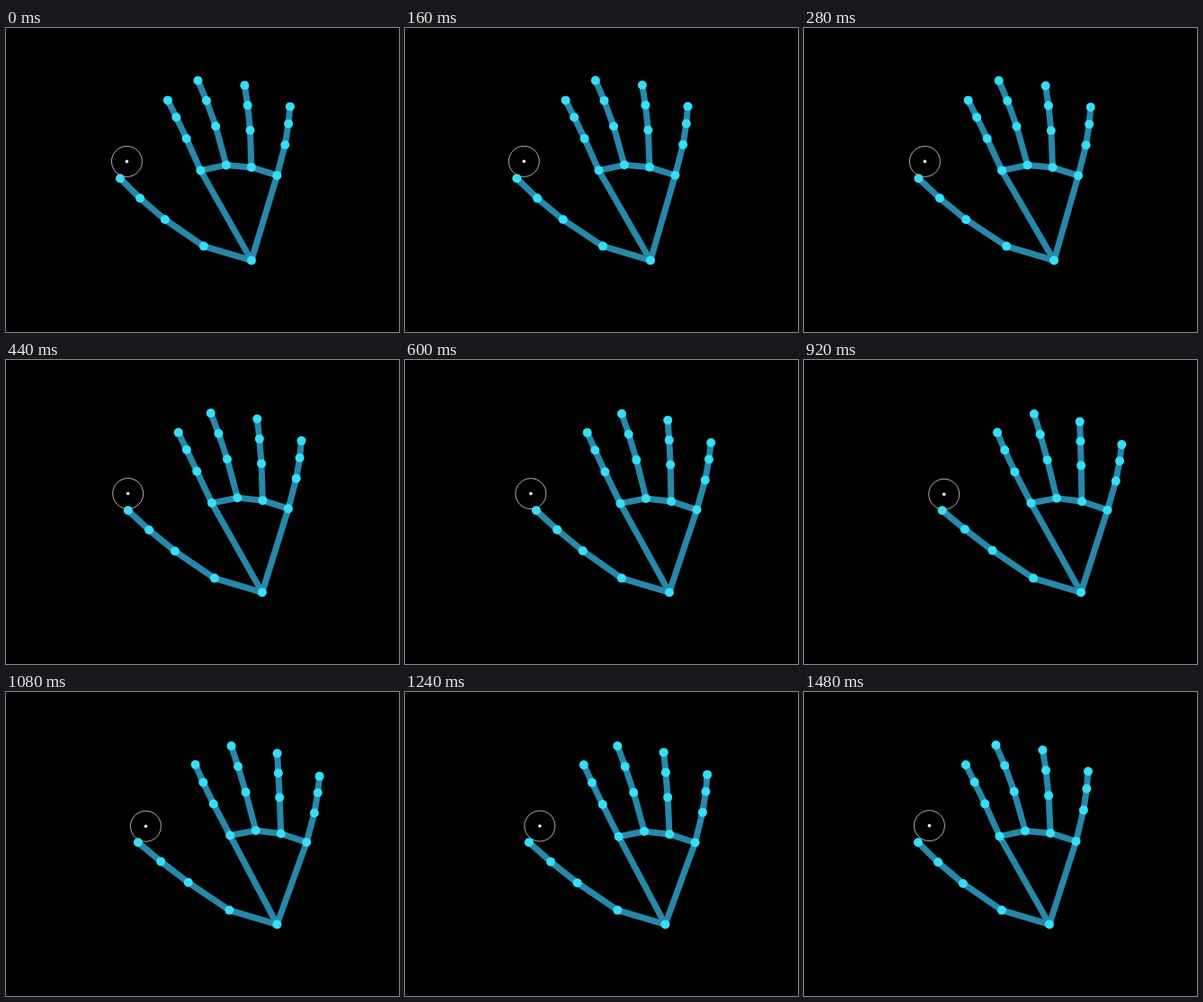
These frames come from a looping animation (437x338 px, 1.52 s). An HTML page with a canvas:

```html
<!DOCTYPE html>
<html lang="en">
<head>
<meta charset="utf-8">
<title>Hand tracking</title>
<style>
  html, body { margin: 0; width: 100%; height: 100%; overflow: hidden; background: #000; }
  canvas { display: block; }
</style>
</head>
<body>
<canvas id="stage" width="437" height="338"></canvas>
<script>
const ctx = document.getElementById("stage").getContext("2d");
const LOOP = 1520, STEP = 40;
const KEYS = [0, 280, 600, 800, 1080, 1240, 1480];

// Sideways sway of each part of the rig, in px from rest
const sway = {
  wrist: [0, 5.2, 21, 34.7, 28.5, 16.5, 0],
  palm: [0, 3.6, 23.1, 33.9, 32.8, 21.2, 1.1],
  tips: [0, 3, 25.3, 37.4, 34.1, 21, 0],
  thumb: [0, 0.5, 19, 28, 20, 11, 0],
  cursor: [0, 0, 5.5, 18, 21, 15.5, 5]
};
const palmDrop = [0, 0, 1.2, 0.8, 1.1, 2.3, 2];
const START_DRIFT = -0.06; // px per ms

// reach: tip sway gain; tilt: sinking per px of sway;
// bow: sideways bulge; straighten: bulge lost per px of sway
const fingers = [
  { knuckle: [216, 158], tip: [179.5, 80], reach: 0.9, tilt: 0, bow: 0.8, straighten: 0.06 },
  { knuckle: [244.5, 152], tip: [213, 58], reach: 1.09, tilt: 0.04, bow: 2.6, straighten: 0.045 },
  { knuckle: [272.5, 154.5], tip: [265, 63.3], reach: 1.06, tilt: 0.13, bow: 2, straighten: 0.05 },
  { knuckle: [301, 163.5], tip: [315.5, 87], reach: 0.96, tilt: 0.18, bow: 2.4, straighten: 0.005 }
];
const thumb = { knuckle: [219.5, 242.2], tip: [126.5, 166.8], bow: -4.2, straighten: -0.05 };

function slope(track, i, first) {
  const rate = k => (track[k + 1] - track[k]) / (KEYS[k + 1] - KEYS[k]);
  if (i === 0) return first;
  if (i === KEYS.length - 1) return rate(i - 1);
  const before = KEYS[i] - KEYS[i - 1], after = KEYS[i + 1] - KEYS[i];
  return (rate(i - 1) * after + rate(i) * before) / (before + after);
}

// Cubic Hermite through the key points
function sample(track, t, first = START_DRIFT) {
  const last = KEYS.length - 1;
  if (t >= KEYS[last]) return track[last];
  const i = KEYS.findIndex((key, k) => t < KEYS[k + 1]);
  const span = KEYS[i + 1] - KEYS[i], u = (t - KEYS[i]) / span;
  const ease = u * u * (3 - 2 * u);
  return track[i] + (track[i + 1] - track[i]) * ease
    + span * u * (1 - u) * ((1 - u) * slope(track, i, first) - u * slope(track, i + 1, first));
}

// Four joints on a slightly bowed line from knuckle to tip
function chain([x0, y0], [x1, y1], bow, split) {
  const dx = x1 - x0, dy = y1 - y0, length = Math.hypot(dx, dy);
  return [0, split, split + 0.305, 1].map(f => {
    const bulge = bow * 4 * f * (1 - f) / length;
    return [x0 + dx * f - dy * bulge, y0 + dy * f + dx * bulge];
  });
}

function fingerPose({ knuckle, tip, reach, tilt, bow, straighten }, palm, tips, drop) {
  return chain(
    [knuckle[0] + palm, knuckle[1] + drop + tilt * palm * 0.35],
    [tip[0] + tips * reach, tip[1] + drop * 0.3 + tilt * palm],
    bow - straighten * palm, 0.45
  );
}

function line(points) {
  ctx.beginPath();
  points.forEach(([x, y]) => ctx.lineTo(x, y));
  ctx.stroke();
}

function disc(x, y, r) {
  ctx.beginPath();
  ctx.arc(x, y, r, 0, Math.PI * 2);
  ctx.fill();
}

function draw(t) {
  ctx.fillStyle = "#000";
  ctx.fillRect(0, 0, 437, 338);

  const shift = {};
  for (const part in sway) shift[part] = sample(sway[part], t);
  const drop = sample(palmDrop, t, 0);

  const wrist = [272.5 + shift.wrist, 258];
  const hand = fingers.map(f => fingerPose(f, shift.palm, shift.tips, drop));
  const thumbJoints = chain(
    [thumb.knuckle[0] + shift.wrist, thumb.knuckle[1]],
    [thumb.tip[0] + shift.thumb, thumb.tip[1]],
    thumb.bow - thumb.straighten * shift.palm, 0.435
  );

  ctx.save();
  ctx.translate(0.4, 0.4);
  ctx.strokeStyle = "#2888a8";
  ctx.lineWidth = 7;
  ctx.lineJoin = "round";
  hand.forEach(line);
  line([wrist, ...hand.map(f => f[0]), wrist]);
  line([wrist, ...thumbJoints]);

  ctx.fillStyle = "#36def8";
  [wrist, ...thumbJoints, ...hand.flat()].forEach(([x, y]) => disc(x, y, 5));

  const x = 134 + shift.cursor, y = 148 + shift.cursor * 0.04;
  ctx.strokeStyle = "#b0b0b0";
  ctx.lineWidth = 1;
  ctx.beginPath();
  ctx.arc(x, y, 17, 0, Math.PI * 2);
  ctx.stroke();
  ctx.fillStyle = "#fff";
  disc(x, y, 1.8);
  ctx.restore();
}

const start = performance.now();
function tick() {
  const t = (performance.now() - start) % LOOP;
  draw(Math.floor(t / STEP) * STEP);
  requestAnimationFrame(tick);
}
tick();
</script>
</body>
</html>
```
